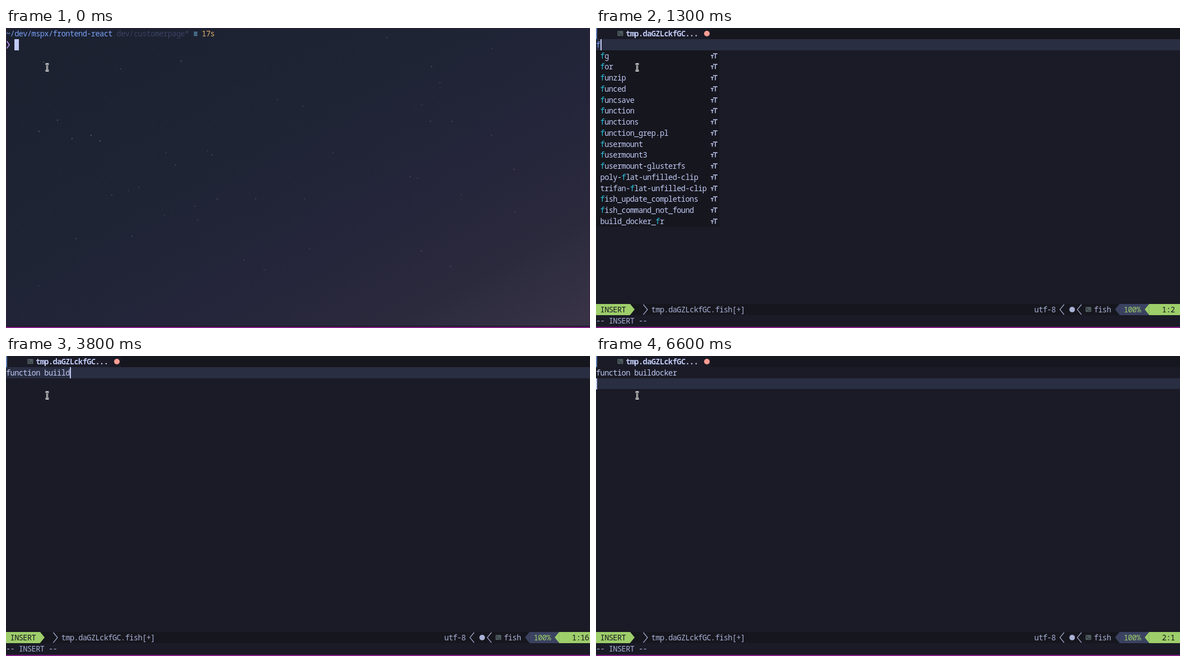
An HTML page for the animation above (8000 ms loop, 1043 by 537 pixels).

```html
<!DOCTYPE html>
<html lang="en">
<head>
<meta charset="utf-8">
<title>Terminal editor</title>
<style>
html, body { margin: 0; width: 100%; height: 100%; overflow: hidden; background: #1a1b26; }
#stage {
  position: relative; width: 1043px; height: 537px; overflow: hidden; background: #1a1b26;
  font-family: "Noto Sans Mono", "DejaVu Sans Mono", monospace; font-stretch: condensed;
  font-variant-ligatures: none;
}
#stage i, #stage span, #stage svg { position: absolute; }
#stage i { display: block; }
#stage span { white-space: pre; line-height: 20px; height: 20px; }
#stage em { font-style: normal; color: #2ac3de; }
#sky {
  position: absolute; inset: 0;
  background: linear-gradient(152deg, #1c2130 0%, #1e2434 38%, #24253a 62%, #2b2a3d 82%, #3a3447 100%);
  box-shadow: inset 1px 0 #3a1c40, inset -1px 0 #3a1c40, inset 0 1px #2c1c3a;
}
#edge { left: 0; top: 535px; width: 1043px; height: 2px; background: #86208a; }
#pointer { left: 68px; top: 62px; }
</style>
</head>
<body>
<div id="stage">
  <div id="view"></div>
  <svg id="pointer" width="11" height="17" fill="none">
    <path d="M2.5 2.5h2l1 1 1-1h2M5.5 3v11M2.5 14.5h2l1-1 1 1h2" stroke="#fff" stroke-width="3"/>
    <path d="M2.5 2.5h2l1 1 1-1h2M5.5 3v11M2.5 14.5h2l1-1 1 1h2" stroke="#15161e"/>
  </svg>
  <i id="edge"></i>
</div>
<script>
const LOOP = 8000, CW = 7.6, CH = 19.75;
const BG = '#1a1b26', DARK = '#16161e', LINE = '#292e42', GUTTER = '#3b4261';
const FG = '#c0caf5', DIM = '#a9b1d6', BLUE = '#7aa2f7', GREEN = '#9ece6a';

const stage = document.getElementById('stage');
const view = document.getElementById('view');

// Fit the face to the terminal grid through size and tracking.
function fitFont() {
  const probe = document.createElement('span');
  probe.style.fontSize = '100px';
  probe.textContent = 'n'.repeat(20);
  stage.append(probe);
  const advance = probe.getBoundingClientRect().width / 2000;
  probe.remove();
  const size = Math.min(15.2, 8.2 / advance);
  stage.style.fontSize = size + 'px';
  stage.style.letterSpacing = CW - advance * size + 'px';
}

const rowY = r => Math.round(r * CH);
const rect = (x, y, w, h, color) =>
  `<i style="left:${x}px;top:${y}px;width:${w}px;height:${h}px;background:${color}"></i>`;
const cells = (col, row, w, h, color) =>
  rect(col * CW, rowY(row), w * CW, rowY(row + h) - rowY(row), color);
const fullRow = (row, color) => rect(0, rowY(row), 1043, rowY(row + 1) - rowY(row), color);
const text = (col, row, s, color, bold) =>
  `<span style="left:${col * CW}px;top:${rowY(row)}px;color:${color}${bold ? ';font-weight:700' : ''}">${s}</span>`;
const svg = (col, row, body) =>
  `<svg style="left:${col * CW}px;top:${rowY(row)}px" width="16" height="20" fill="none">${body}</svg>`;

const arrowRight = (col, color) => svg(col, 25, `<path d="M0 0 8 9.8 0 19.6z" fill="${color}"/>`);
const arrowLeft = (col, color) => svg(col, 25, `<path d="M7.8 0 0 9.8 7.8 19.6z" fill="${color}"/>`);
const chevron = (col, d) => svg(col, 25, `<path d="${d}" stroke="${DIM}" stroke-width="1.2"/>`);
const shellIcon = (col, row) => svg(col, row,
  '<rect x=".3" y="5.3" width="10.2" height="9" rx="1" fill="#4d5a5e"/>' +
  `<path d="M2 7.3l2 2-2 2M5.2 11.7h3" stroke="${DARK}"/>`);
const kindIcon = (col, row) => svg(col, row,
  `<path d="M4 6.2h8M8.2 6v8.5M0 9.2h5M2.7 9v5.5" stroke="${DIM}" stroke-width="1.8"/>`);

const STARS = [
  58,184, 117,197, 151,191, 167,201, 91,164, 312,58, 66,60, 204,72, 529,139, 484,127,
  741,136, 757,166, 796,166, 866,191, 583,222, 359,219, 367,226, 302,244, 285,222, 236,284,
  218,290, 188,298, 376,305, 336,318, 341,343, 282,334, 124,376, 224,372, 424,414, 460,432,
  541,394, 741,398, 793,426, 721,265, 734,268, 812,297, 906,252, 908,328, 445,305, 532,305,
  57,461, 679,16, 759,68, 774,97, 867,36];

function sky() {
  let out = '<div id="sky">';
  for (let k = 0; k < STARS.length; k += 2) {
    const alpha = k < 12 ? 0.35 : 0.14 + (k * 7 % 5) * 0.03;
    out += rect(STARS[k], STARS[k + 1], 1.5, 1.5, `rgba(200,165,160,${alpha})`);
  }
  return out + rect(0, 533, 1043, 2, '#1b1a28') + '</div>';
}

function shell() {
  return sky() +
    text(0, 0, '~/dev/mspx/frontend-react', BLUE) +
    text(26, 0, 'dev/customerpage*', GUTTER) +
    text(44, 0, '≡', '#7dcfff') +
    text(46, 0, '17s', '#e0af68') +
    svg(0, 1, '<path d="M1.5 3.5 6 10 1.5 16.5" stroke="#bb9af7" stroke-width="1.5"/>') +
    cells(2, 1, 1, 1, FG);
}

const WORDS = (': . \\[ bg cd fg if or and end for not pwd set bind case echo else emit eval ' +
  'funzip funced funcsave function functions function_grep.pl fusermount fusermount3 ' +
  'fusermount-glusterfs poly-flat-unfilled-clip trifan-flat-unfilled-clip ' +
  'fish_update_completions fish_command_not_found builtin build_docker_fr').split(' ');

// Fuzzy match: the first letter must open a word part, the rest follow in order.
function match(word, query) {
  if (!query) return [];
  const first = word.search(new RegExp('(^|[-_])' + query[0]));
  if (first < 0) return null;
  const hits = [word.indexOf(query[0], first)];
  for (const ch of query.slice(1)) {
    const last = hits[hits.length - 1];
    const at = word.indexOf(ch, last + 1);
    if (at < 0) return null;
    if (at - last <= 3) for (let k = last + 1; k < at; k++) hits.push(k);
    hits.push(at);
  }
  return hits;
}

function popup(col, query) {
  const found = WORDS.map(word => ({ word, hits: match(word, query) })).filter(m => m.hits);
  const list = found.slice(0, 20);
  if (!list.length) return '';
  const scrolls = found.length > 20;
  const width = Math.max(scrolls ? 11 : 0, ...list.map(m => m.word.length));
  let out = cells(col - 1, 1 + 1, width + 4, list.length, DARK);
  list.forEach(({ word, hits }, k) => {
    const label = [...word].map((c, n) => hits.includes(n) ? `<em>${c}</em>` : c).join('');
    out += text(col, k + 2, label, FG) + kindIcon(col + width + 1, k + 2);
  });
  if (scrolls) {
    const bar = col + width + 3;
    out += cells(bar, 2, 1, list.length, '#20222c') + cells(bar, 2, 1, 8, GUTTER);
  }
  return out;
}

function statusBar(insert, changed, pos) {
  const accent = insert ? GREEN : BLUE;
  return fullRow(25, DARK) +
    cells(0, 25, 8, 1, accent) + arrowRight(8, accent) +
    text(1, 25, insert ? 'INSERT' : 'NORMAL', DARK) +
    chevron(11, 'M.5 1 8 10 .5 19') +
    text(13, 25, 'tmp.daGZLckfGC.fish' + (changed ? '[+]' : ''), DIM) +
    text(103, 25, 'utf-8', DIM) +
    chevron(109, 'M8 1 .5 10 8 19') +
    svg(111, 25, `<circle cx="6.4" cy="10" r="5" fill="${DIM}"/>`) +
    chevron(113, 'M8 1 .5 10 8 19') +
    shellIcon(115, 25) + text(117, 25, 'fish', DIM) +
    arrowLeft(122, GUTTER) + cells(123, 25, 7, 1, GUTTER) +
    text(124, 25, '100%', accent) +
    arrowLeft(129, accent) + cells(130, 25, 8, 1, accent) +
    text(133, 25, pos, DARK) +
    (insert ? text(0, 26, '-- INSERT --', DIM) : '');
}

function editor(mode, body, query) {
  const insert = mode === 'insert';
  const lines = body.split('\n');
  const row = lines.length, line = lines[row - 1];
  const col = insert ? line.length : Math.max(0, line.length - 1);
  const wordStart = line.lastIndexOf(' ') + 1;
  if (query === undefined) query = line.slice(wordStart);

  let out = rect(0, 0, 1043, 535, BG) +
    rect(205, 0, 838, 20, DARK) + rect(0, 0, 2, 20, '#6183bb') +
    shellIcon(5, 0) + text(7, 0, 'tmp.daGZLckfGC...', FG, true);
  if (body) out += rect(192.5, 5, 10, 10, '#ff9e94;border-radius:50%');
  out += fullRow(row, LINE);
  lines.forEach((s, k) => { out += text(0, k + 1, s, body.includes(' ') ? FG : BLUE); });
  if (insert && line) out += popup(wordStart + 1 - (wordStart ? 1 : 0), query);
  if (insert) out += rect(Math.round(col * CW), rowY(row), 1.5, 20, FG);
  else out += cells(col, row, 1, 1, FG) + text(col, row, line[col] || '', BG);
  return out + statusBar(insert, body !== '', `${row}:${col + 1}`);
}

const type = (time, body, query) => [time, () => editor('insert', body, query)];
const FN = 'function ';
const STEPS = [
  [0, shell],
  [600, () => sky() + cells(0, 0, 1, 1, FG)],
  [800, () => editor('normal', '')],
  type(1300, 'f'),
  type(1900, 'fu'),
  type(2000, 'fun'),
  type(2100, 'func'),
  type(2200, 'funct'),
  type(2300, 'functio'),
  type(2400, 'function'),
  type(3100, FN + 'b', ''),
  type(3200, FN + 'bu'),
  type(3400, FN + 'bui'),
  type(3500, FN + 'buii'),
  type(3700, FN + 'buiil'),
  type(3800, FN + 'buiild'),
  type(4200, FN + 'buiil'),
  type(4400, FN + 'buii'),
  type(4500, FN + 'bui'),
  type(4700, FN + 'buil'),
  type(4900, FN + 'build'),
  type(5100, FN + 'buildo'),
  type(5700, FN + 'buildoc'),
  type(5900, FN + 'buildock'),
  type(6000, FN + 'buildocke'),
  type(6200, FN + 'buildocker'),
  [6400, () => editor('normal', FN + 'buildocker')],
  type(6600, FN + 'buildocker\n')
];

let shown = -1;
function tick() {
  const t = performance.now() % LOOP;
  let now = STEPS.length - 1;
  while (STEPS[now][0] > t) now--;
  if (now !== shown) {
    view.innerHTML = STEPS[now][1]();
    shown = now;
  }
  requestAnimationFrame(tick);
}

fitFont();
tick();
</script>
</body>
</html>
```
